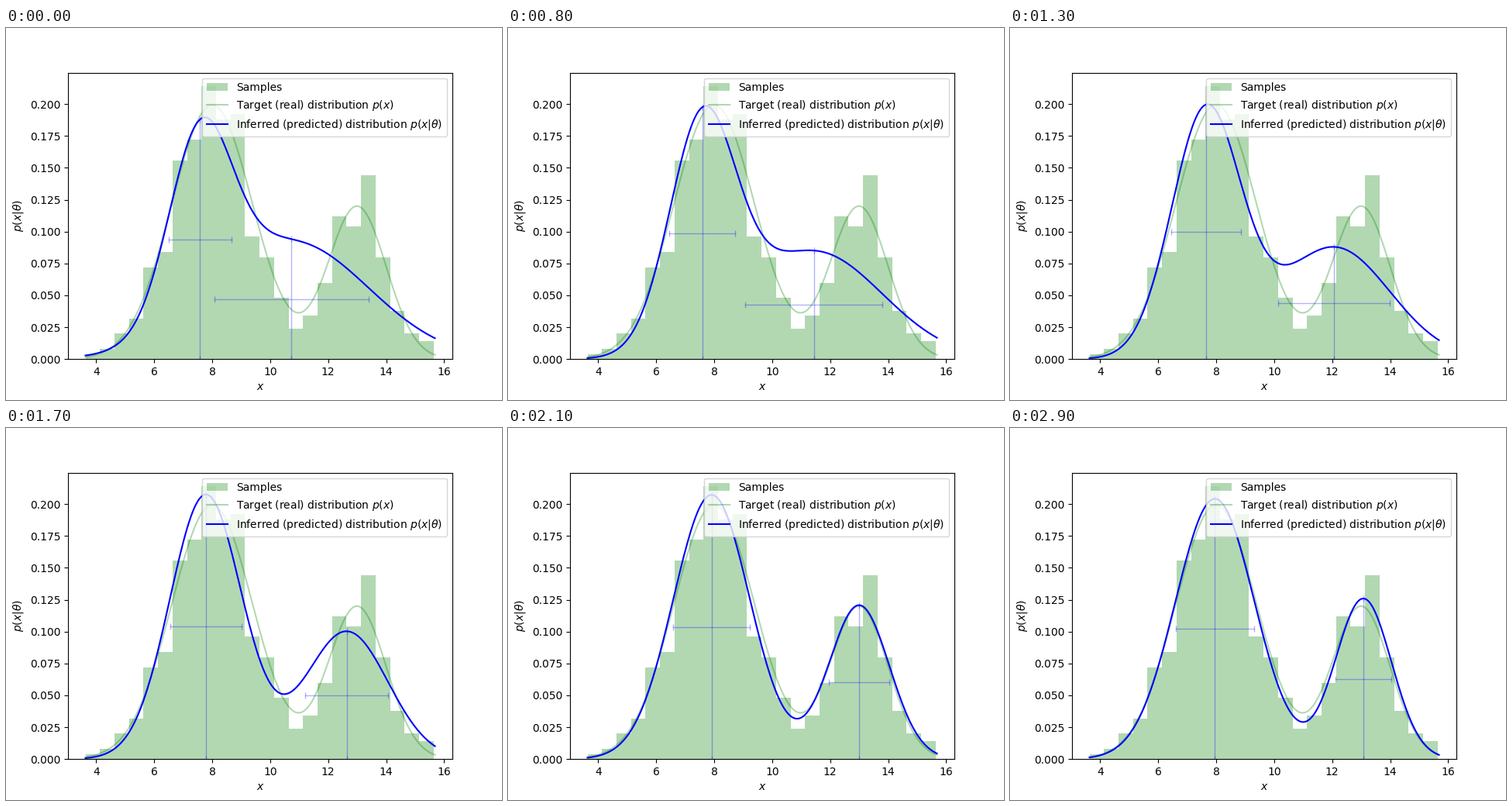
A matplotlib script for the animation above (3 s loop, 640 by 480 pixels).

```python
import numpy as np
import matplotlib.pyplot as plt
from matplotlib.animation import FuncAnimation

FRAMES, INTERVAL = 30, 100
X_MIN, X_MAX, BIN = 3.634, 15.681, 0.5
SUB = 10  # points standing in for the samples of one bin

# Mixtures are w1, mu1, mu2, sigma1, sigma2
TARGET = (0.7, 8, 13, 1.4, 1)
START = (0.385, 7.578, 10.731, 1.08, 2.662)

# Samples per bin; the last two of the 1000 lie at X_MAX, past the last edge
counts = np.array([2, 4, 10, 16, 36, 42, 78, 86, 107, 94, 96, 48,
                   40, 24, 12, 17, 30, 56, 52, 72, 40, 19, 10, 7])
total = 1000
edges = X_MIN + BIN * np.arange(len(counts) + 1)


def components(x, theta):
    """Weighted densities of both Gaussians, along the last axis."""
    w, m1, m2, s1, s2 = theta
    weights, mus, sigmas = np.array([w, 1 - w]), np.array([m1, m2]), np.array([s1, s2])
    z = (np.asarray(x)[..., None] - mus) / sigmas
    return weights * np.exp(-z**2 / 2) / (sigmas * np.sqrt(2 * np.pi))


def mixture(x, theta):
    return components(x, theta).sum(axis=-1)


def spread_samples():
    """Points and masses: each bin's samples follow the target inside the bin."""
    points = edges[:-1, None] + BIN * (np.arange(SUB) + 0.5) / SUB
    shape = mixture(points, TARGET)
    mass = counts[:, None] / total * shape / shape.sum(axis=1, keepdims=True)
    return np.append(points, X_MAX), np.append(mass, 1 - counts.sum() / total)


def em_step(theta, points, mass):
    """One expectation-maximization update."""
    dens = components(points, theta)
    resp = mass[:, None] * dens / dens.sum(axis=1, keepdims=True)
    share = resp.sum(axis=0)
    mu = resp.T @ points / share
    sigma = np.sqrt((resp * (points[:, None] - mu) ** 2).sum(axis=0) / share)
    return np.array([share[0], *mu, *sigma])


samples = spread_samples()
path = [np.array(START)]
while len(path) < FRAMES:
    path.append(em_step(path[-1], *samples))

fig, ax = plt.subplots(figsize=(6.4, 4.8), dpi=100)
xs = np.linspace(X_MIN, X_MAX, 200)

ax.hist(edges[:-1] + BIN / 2, bins=edges, weights=counts / (total * BIN),
        color="g", alpha=0.3, label="Samples")
ax.plot(xs, mixture(xs, TARGET), "g", alpha=0.3,
        label="Target (real) distribution $p(x)$")
curve, = ax.plot([], [], "b", label=r"Inferred (predicted) distribution $p(x|\theta)$")
stems = [ax.plot([], [], "b|-", lw=1, alpha=0.3)[0] for _ in range(2)]
spreads = [ax.plot([], [], "b|-", lw=1, alpha=0.3)[0] for _ in range(2)]

margin = 0.05 * (X_MAX - X_MIN)
ax.set_xlim(X_MIN - margin, X_MAX + margin)
ax.set_ylim(0, 1.05 * counts.max() / (total * BIN))
ax.set_xlabel("$x$")
ax.set_ylabel(r"$p(x|\theta)$")
ax.legend(loc="upper right")


def update(step):
    theta = path[step]
    curve.set_data(xs, mixture(xs, theta))
    for stem, spread, mu, sigma in zip(stems, spreads, theta[1:3], theta[3:5]):
        peak = mixture(mu, theta)
        stem.set_data([mu, mu], [0, peak])
        spread.set_data([mu - sigma, mu + sigma], [peak / 2, peak / 2])
    return [curve, *stems, *spreads]


anim = FuncAnimation(fig, update, frames=FRAMES, interval=INTERVAL,
                     repeat=True, repeat_delay=0)
plt.show()
```
